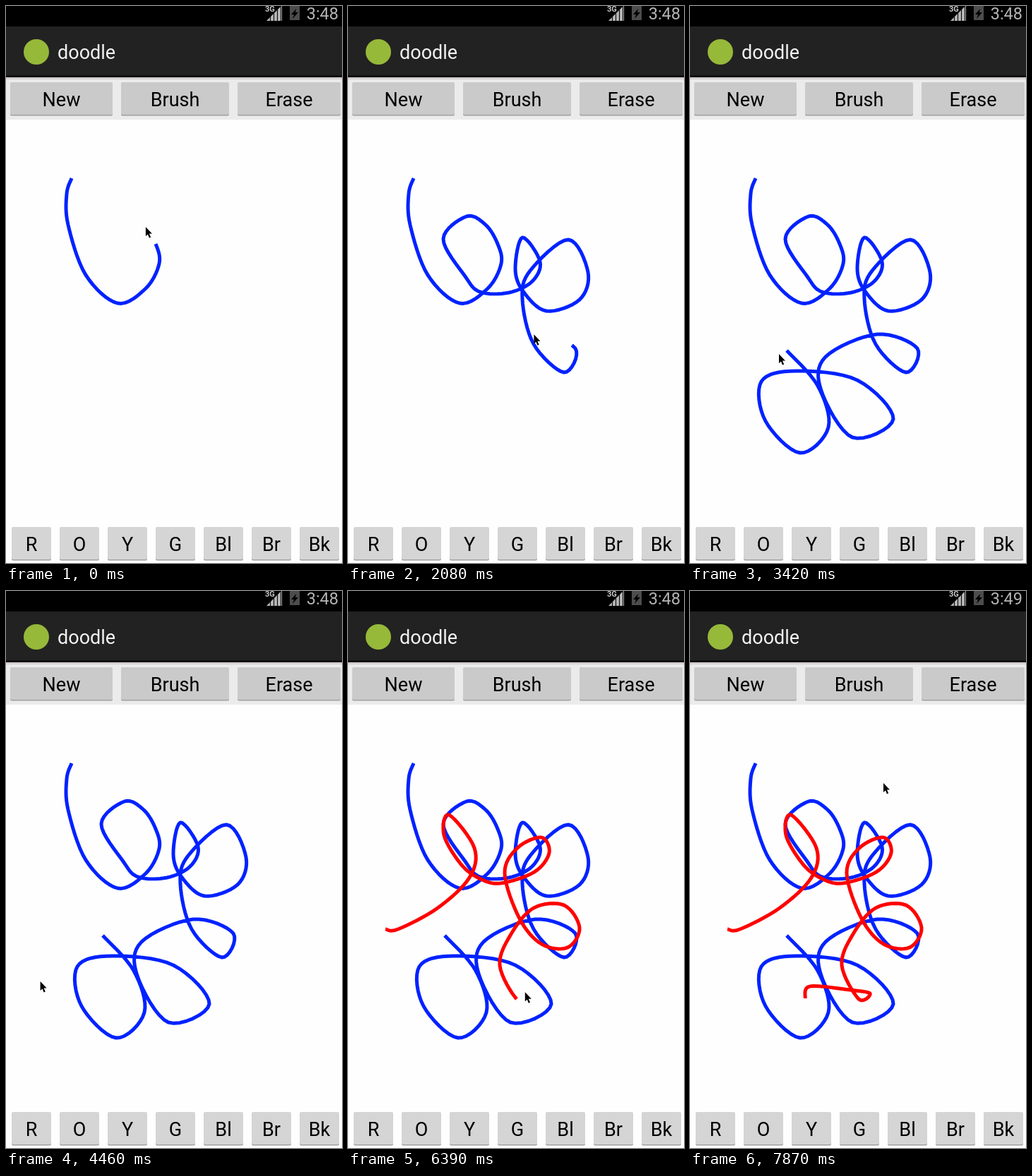
Recreate the animation shown at these times as an HTML page with a canvas. Size 476 px wide and 789 px high, loop 8 s.

```html
<!DOCTYPE html>
<html lang="en">
<head>
<meta charset="utf-8">
<title>doodle</title>
<style>
  html, body { margin: 0; width: 100%; height: 100%; overflow: hidden; background: #fefefe; }
  canvas { display: block; }
</style>
</head>
<body>
<canvas id="stage" width="476" height="789"></canvas>
<script>
const ctx = document.getElementById("stage").getContext("2d");
const LOOP = 8000, STEP = 148.48;
const LEAD = 0.6; // steps by which the pointer runs ahead of the ink

const parse = text => text.trim().split(/\s+/).map(pair => pair.split(",").map(Number));

// Both doodles are smooth curves through a few knots, drawn at a steady pace in knots per step.
const blue = {
  color: "#0022ff",
  progress: step => 7 + step * 1.44,
  knots: parse(`
    93,244 86,266 88,310 113,381 158,421 198,400 217,365 212,337 195,310 168,298
    135,330 166,383 187,405 228,406 261,390 272,362 247,328 237,372 248,404 281,432
    328,416 340,377 312,331 258,375 247,415 263,479 306,519 322,485 265,465 192,497
    186,545 230,611 288,585 237,530 150,517 101,532 107,588 156,633 196,597 181,538
    137,488`)
};
const red = {
  color: "#ff0000",
  progress: step => 8 + (step - 36) * 15 / 7,
  knots: parse(`
    53,479 71,479 127,449 172,406 179,364 143,317 136,346 160,387 186,407 216,414
    264,398 285,371 274,349 240,364 222,400 243,464 274,500 311,505 328,477 306,445
    263,449 231,486 215,530 239,578 255,570 226,565 170,560 163,577`)
};

// Resting places of the pointer between strokes: step, x, y
const rests = [
  [23, 126, 493], [25, 36, 764], [28, 36, 764], [31, 53, 479],
  [45, 163, 577], [49, 102, 766], [50, 104, 764], [53, 274, 272]
];

// Catmull-Rom curve; u counts knots
function pointAt(knots, u) {
  const i = Math.min(Math.floor(u), knots.length - 2), t = u - i;
  const knot = k => knots[Math.max(0, Math.min(knots.length - 1, k))];
  const [a, b, c, d] = [-1, 0, 1, 2].map(k => knot(i + k));
  return [0, 1].map(k => b[k] + t / 2 * (c[k] - a[k]
    + t * (2 * a[k] - 5 * b[k] + 4 * c[k] - d[k]
    + t * (3 * (b[k] - c[k]) + d[k] - a[k]))));
}

function glide(step) {
  const next = Math.max(1, rests.findIndex(rest => rest[0] >= step));
  const [t0, x0, y0] = rests[next - 1], [t1, x1, y1] = rests[next];
  const t = (step - t0) / (t1 - t0), eased = t * t * (3 - 2 * t);
  return [x0 + (x1 - x0) * eased, y0 + (y1 - y0) * eased];
}

function pointerAt(step) {
  for (const { knots, progress } of [blue, red]) {
    const u = progress(step + LEAD);
    if (u >= 0 && u <= knots.length - 1) return pointAt(knots, u);
  }
  return glide(step);
}

function rect(x, y, w, h, color, radius = 0) {
  ctx.beginPath();
  ctx.roundRect(x, y, w, h, radius);
  ctx.fillStyle = color;
  ctx.fill();
}

function polygon(points, color) {
  ctx.beginPath();
  points.forEach(([x, y]) => ctx.lineTo(x, y));
  ctx.fillStyle = color;
  ctx.fill();
}

function label(text, x, y, size, color, align = "left", weight = 400) {
  ctx.font = `${weight} ${size}px Roboto, sans-serif`;
  ctx.textAlign = align;
  ctx.fillStyle = color;
  ctx.fillText(text, x, y);
}

function button(text, x, y, w, color) {
  rect(x, y + 1, w, 46.5, "#a0a0a0", 2);
  rect(x, y, w, 46, color, 2);
  label(text, x + w / 2, y + 34, 27, "#000", "center");
}

function statusBar(clock) {
  rect(0, 0, 476, 29, "#000");
  polygon([[369, 21], [391, 21], [391, -1]], "#b4b4b4");
  for (let x = 374; x < 390; x += 5) rect(x, 0, 1, 21, "#000");
  rect(366, 0, 15, 9, "#000");
  label("3G", 367, 8, 11, "#c8c8c8", "left", 700);
  rect(402, 0, 14, 20, "#4c4c4c");
  polygon([[411, 4], [404, 12], [408, 12], [406, 18], [414, 9], [410, 9]], "#000");
  label(clock, 471, 19, 23.5, "#b4b4b4", "right");
}

function drawScreen(step) {
  rect(0, 0, 476, 789, "#fefefe");
  statusBar(step < 45 ? "3:48" : "3:49");
  rect(0, 29, 476, 69, "#222");
  rect(0, 98, 476, 3, "#101010");
  rect(0, 101, 476, 60, "#ebebeb");
  rect(0, 101, 476, 3, "#d6ced3");
  rect(25, 47, 36, 36, "#96b93a", 18);
  label("doodle", 73, 75, 27, "#f3f3f3");
  button("New", 6, 108, 145, "#cacaca");
  button("Brush", 163, 108, 153, "#cacaca");
  button("Erase", 328, 108, 146, "#cacaca");
  ["R", "O", "Y", "G", "Bl", "Br", "Bk"].forEach((name, i) =>
    button(name, 8 + i * 68, 738, 56, "#d5d5d5"));
}

function drawStroke({ knots, progress, color }, step) {
  const end = Math.min(progress(step), knots.length - 1);
  if (end <= 0) return;
  ctx.beginPath();
  for (let u = 0; u < end; u += 1 / 8) ctx.lineTo(...pointAt(knots, u));
  ctx.lineTo(...pointAt(knots, end));
  ctx.strokeStyle = color;
  ctx.lineWidth = 5;
  ctx.lineJoin = "round";
  ctx.stroke();
}

function drawPointer([x, y]) {
  const arrow = [[0, 0], [0, 13], [3, 10.5], [5, 15.5], [7.2, 14.5], [5, 9.5], [9, 9.5]];
  polygon(arrow.map(([dx, dy]) => [x + dx, y + dy]), "#000");
}

let start;
function frame(now) {
  start ??= now;
  const step = Math.floor((now - start) % LOOP / STEP);
  drawScreen(step);
  drawStroke(blue, step);
  drawStroke(red, step);
  drawPointer(pointerAt(step));
  requestAnimationFrame(frame);
}
requestAnimationFrame(frame);
</script>
</body>
</html>
```
